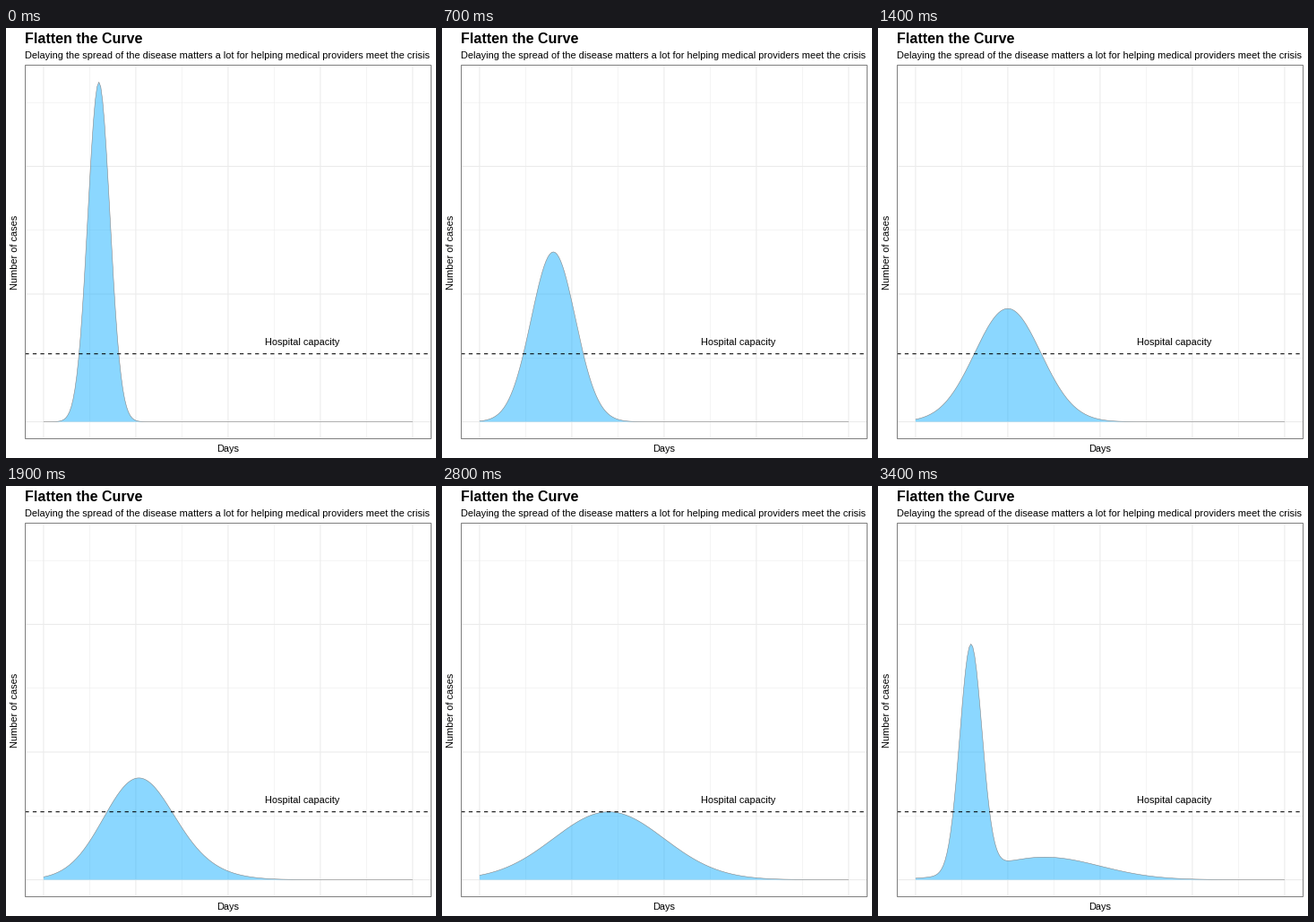
Animation, 480 px wide and 480 px high, one loop 3500 ms. Source, as a matplotlib script:

```python
import numpy as np
import matplotlib.pyplot as plt
from matplotlib.animation import FuncAnimation

SIZE, DPI = 480, 100
PT = 72 / DPI                      # points per pixel
LEFT, RIGHT, TOP, BOTTOM = 21.3, 474.5, 41.4, 458.5
DAYS = np.arange(0, 201)
PAD = 0.05 / 1.1                   # panel expansion on each side
PEAK = 380 / 379

# (mean, standard deviation) of each successive epidemic
BELLS = [(30, 6), (40, 12), (50, 18), (60, 24), (70, 30)]
# (frame at which the next bell is reached, steps taken to get there)
MOVES = [(7, 4), (14, 3), (21, 3), (28, 3), (35, 3)]
FRAMES, INTERVAL = 35, 100


def to_x(day):
    width = RIGHT - LEFT
    return LEFT + width * (PAD + day / 200 / 1.1)


def to_y(height):
    """Pixel row of a height given relative to the tallest peak."""
    return BOTTOM - (BOTTOM - TOP) * (PAD + height / 1.1)


def bell(mean, sd):
    return BELLS[0][1] / sd * np.exp(-0.5 * ((DAYS - mean) / sd) ** 2)


CURVES = [bell(*b) for b in BELLS]


def curve_at(frame):
    heights = CURVES[0]
    for k, (end, steps) in enumerate(MOVES):
        t = np.clip((frame - end + steps) / steps, 0, 1)
        heights = (1 - t) * heights + t * CURVES[(k + 1) % len(CURVES)]
    return heights


plt.rcParams["font.family"] = "Liberation Sans"
fig = plt.figure(figsize=(SIZE / DPI, SIZE / DPI), dpi=DPI, facecolor="white")
ax = fig.add_axes([0, 0, 1, 1])
ax.set(xlim=(0, SIZE), ylim=(SIZE, 0))
ax.axis("off")


def line(xs, ys, color, width, **kw):
    return ax.plot(xs, ys, color=color, lw=width * PT, snap=False,
                   solid_capstyle="butt", dash_capstyle="butt", **kw)[0]


def label(x, y, text, size=11, **kw):
    ax.text(x, y, text, fontsize=size * PT, color="black",
            **{"va": "baseline", "ha": "center", **kw})


GRID = "#ebebeb"
for i in range(9):
    x = to_x(25 * i)
    line([x, x], [TOP, BOTTOM], GRID, 0.53 if i % 2 else 1.07, zorder=1)
for i in range(6):
    y = to_y(i * 0.0125 / 0.0665)
    line([LEFT, RIGHT], [y, y], GRID, 0.53 if i % 2 else 1.07, zorder=1)

area = ax.fill([0], [0], facecolor="#18b0ff", alpha=0.5, lw=0, zorder=2)[0]
outline = line([], [], "#7f7f7f", 0.53, zorder=3)

capacity = to_y(0.2)
line([LEFT, RIGHT], [capacity] * 2, "black", 1.07, ls=(0, (4, 4)), zorder=4)

ax.add_patch(plt.Rectangle((21.5, 41.5), 453, 417, fill=False, ec="#7f7f7f",
                           lw=PT, snap=False, zorder=5))

label(21, 17, "Flatten the Curve", 16, ha="left", weight="bold")
label(21, 34, "Delaying the spread of the disease matters a lot for "
      "helping medical providers meet the crisis", ha="left")
label(to_x(140), 354, "Hospital capacity")
label((LEFT + RIGHT) / 2, 473, "Days")
label(13, (TOP + BOTTOM) / 2 + 0.5, "Number of cases", rotation=90,
      ha="right", va="center", rotation_mode="default")
ax.texts[-1].set(ha="center", va="baseline", rotation_mode="anchor")


def update(frame):
    xs, ys = to_x(DAYS), to_y(curve_at(frame))
    base = to_y(0)
    area.set_xy(np.column_stack([np.r_[xs, xs[-1], xs[0]],
                                 np.r_[ys, base, base]]))
    outline.set_data(xs, ys)
    return area, outline


anim = FuncAnimation(fig, update, frames=FRAMES, interval=INTERVAL,
                     repeat=True, repeat_delay=0, blit=False)
plt.show()
```
